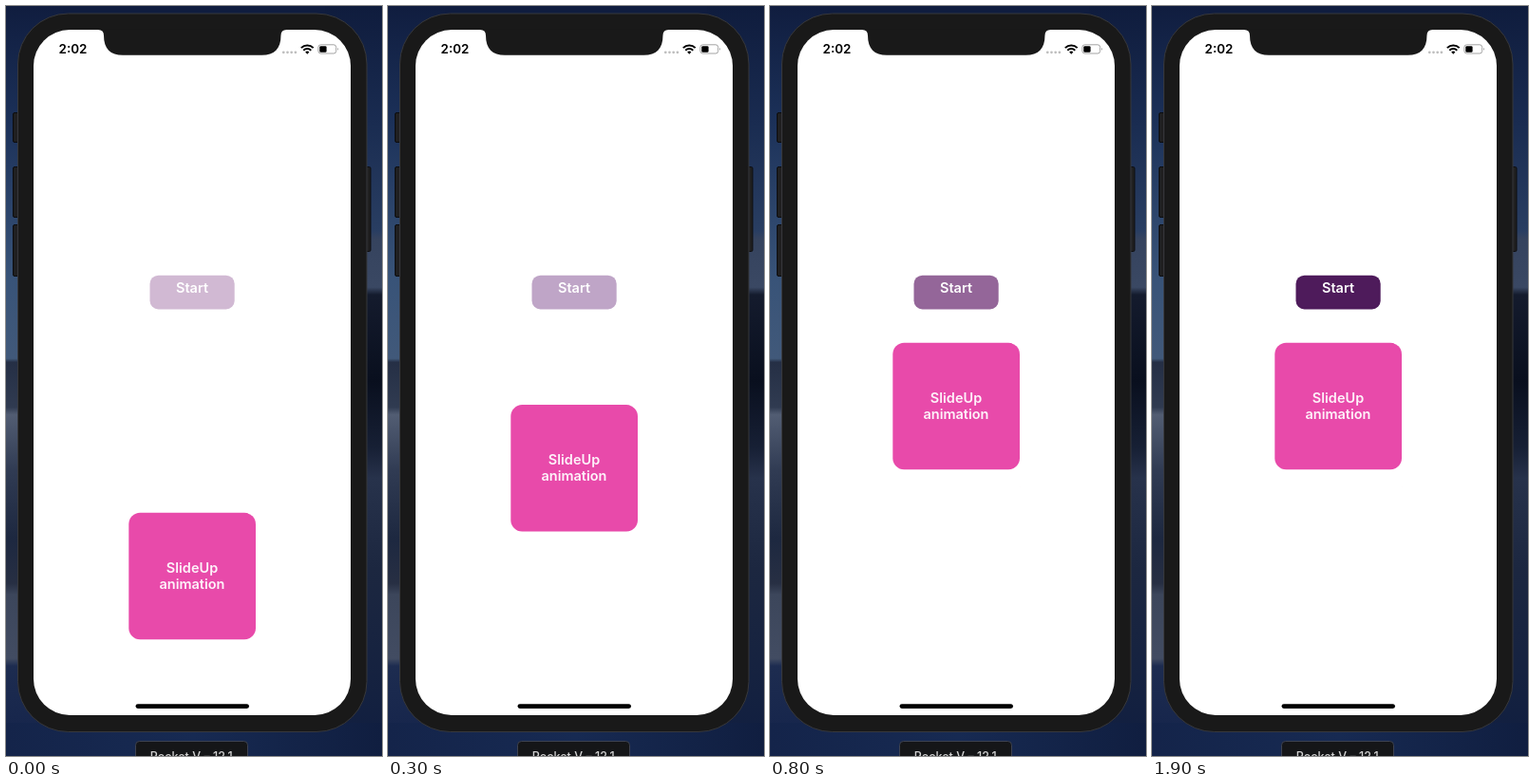
An HTML page for the animation above (2 s loop, 396x790 px).

```html
<!DOCTYPE html>
<html lang="en">
<head>
<meta charset="utf-8">
<style>
  html, body { margin: 0; width: 100%; height: 100%; overflow: hidden; background: #14213f; }
  svg { display: block; width: 396px; height: 790px; }
  text { font-family: Inter, "Open Sans", sans-serif; font-weight: 600; font-size: 14.5px; text-anchor: middle; fill: #fff; }
</style>
</head>
<body>
<svg viewBox="0 0 396 790">
  <defs>
    <linearGradient id="leftSky" gradientUnits="userSpaceOnUse" x1="0" y1="0" x2="0" y2="790">
      <stop offset="0" stop-color="#101d3f"/>
      <stop offset=".15" stop-color="#1b3058"/>
      <stop offset=".36" stop-color="#385378"/>
      <stop offset=".47" stop-color="#41597a"/>
      <stop offset=".475" stop-color="#252f45"/>
      <stop offset=".535" stop-color="#303b51"/>
      <stop offset=".545" stop-color="#525d73"/>
      <stop offset=".62" stop-color="#303b53"/>
      <stop offset=".71" stop-color="#1d2840"/>
      <stop offset=".77" stop-color="#272f43"/>
      <stop offset=".785" stop-color="#3c465b"/>
      <stop offset=".87" stop-color="#424c62"/>
      <stop offset=".88" stop-color="#1d2c50"/>
      <stop offset="1" stop-color="#14234a"/>
    </linearGradient>
    <linearGradient id="rightSky" gradientUnits="userSpaceOnUse" x1="0" y1="0" x2="0" y2="790">
      <stop offset="0" stop-color="#0f1c3d"/>
      <stop offset=".15" stop-color="#192b50"/>
      <stop offset=".3" stop-color="#293e62"/>
      <stop offset=".31" stop-color="#35435e"/>
      <stop offset=".375" stop-color="#3a4863"/>
      <stop offset=".385" stop-color="#141b2d"/>
      <stop offset=".5" stop-color="#090f1e"/>
      <stop offset=".59" stop-color="#172035"/>
      <stop offset=".63" stop-color="#27324b"/>
      <stop offset=".75" stop-color="#1c2740"/>
      <stop offset="1" stop-color="#101e40"/>
    </linearGradient>
    <linearGradient id="ground">
      <stop offset="0" stop-color="#14244a"/>
      <stop offset=".5" stop-color="#172a52"/>
      <stop offset="1" stop-color="#101e40"/>
    </linearGradient>
  </defs>

  <!-- desktop backdrop -->
  <rect width="396" height="790" fill="url(#ground)"/>
  <rect width="70" height="755" fill="url(#leftSky)"/>
  <rect x="326" width="70" height="755" fill="url(#rightSky)"/>
  <rect x="60" width="276" height="12" fill="#101d3f"/>

  <!-- handset -->
  <g fill="#202021" stroke="#0c0c0e">
    <rect x="7.5" y="112.5" width="9" height="31" rx="1.5"/>
    <rect x="7.5" y="169.500" width="9" height="53" rx="1.5"/>
    <rect x="7.5" y="230.500" width="9" height="54" rx="1.5"/>
    <rect x="375" y="169.500" width="9" height="89" rx="1.5"/>
  </g>
  <rect x="12.500" y="8" width="367.500" height="756.500" rx="53" fill="#191919" stroke="#37383c"/>
  <rect x="29" y="25" width="334" height="722" rx="38" fill="#fff"/>
  <path d="M97 24.500V25q6 0 6 6c0 14 7 20.800 20 20.800H269.500c13 0 20-6.800 20-20.800q0-6 6-6v-.5z" fill="#191919"/>

  <!-- status bar -->
  <text x="70.500" y="50" style="font-size:13.400px;fill:#000">2:02</text>
  <path d="M292.300 48.800h0M296.500 48.800h0M300.700 48.800h0M304.900 48.800h0" stroke="#bebebe" stroke-width="2.800" stroke-linecap="round"/>
  <g fill="none" stroke="#000" stroke-width="2">
    <path d="M310.900 44.100a9 9 0 0 1 12.800 0"/>
    <path d="M313.300 46.700a5.600 5.600 0 0 1 8 0"/>
  </g>
  <path d="M317.300 50.700l-2.100-2.200a3 3 0 0 1 4.200 0z"/>
  <rect x="328.900" y="40.800" width="18.800" height="9.200" rx="2.600" fill="#fff" stroke="#999" stroke-width=".9"/>
  <rect x="330.300" y="42.200" width="7.300" height="6.500" rx="1.300"/>
  <path d="M349 43.800q1.700 1.600 0 3.200z" fill="#888"/>

  <rect id="button" x="151.500" y="283.700" width="89.200" height="35.700" rx="9"/>
  <text x="196" y="302">Start</text>

  <g id="card">
    <rect x="129.300" y="0" width="133.700" height="133.500" rx="12" fill="#e84aaa"/>
    <text x="196" y="63.200" fill-opacity=".93">SlideUp</text>
    <text x="196" y="79.900" fill-opacity=".93">animation</text>
  </g>

  <rect x="136.500" y="735.200" width="119.500" height="4.800" rx="2.400"/>

  <!-- device caption -->
  <rect x="136.500" y="774.500" width="118" height="24" rx="4" fill="#151618" stroke="#3d4250"/>
  <text x="195.300" y="794.800" style="font-size:12.500px;font-weight:500;fill:#d2d2d2">Pocket V – 12.1</text>
</svg>
<script>
  const LOOP = 2000, STEP = 100, REST_Y = 354.8;
  const button = document.getElementById('button');
  const card = document.getElementById('card');

  // time in ms, then red, green, blue
  const tints = [
    [0, 209, 185, 211],
    [200, 197, 173, 205],
    [400, 185, 156, 192],
    [600, 168, 129, 173],
    [1100, 117, 61, 124],
    [1400, 94, 34, 103],
    [1900, 78, 27, 91]
  ];

  function tintAt(time) {
    const next = Math.max(1, tints.findIndex(([start]) => start >= time));
    const from = tints[next - 1], to = tints[next];
    const mix = (time - from[0]) / (to[0] - from[0]);
    return `rgb(${[1, 2, 3].map(i => Math.round(from[i] + (to[i] - from[i]) * mix))})`;
  }

  // Decelerating slide that comes to rest at 600 ms.
  function distanceLeft(time) {
    const k = Math.min(time, 600) / 200;
    return 179 - 78 * k + 6 * k * (k - 1) + 19 / 6 * k * (k - 1) * (k - 2);
  }

  function draw(now) {
    const time = Math.floor(now % LOOP / STEP) * STEP;
    button.setAttribute('fill', tintAt(time));
    card.setAttribute('transform', `translate(0 ${REST_Y + distanceLeft(time)})`);
    requestAnimationFrame(draw);
  }
  draw(0);
</script>
</body>
</html>
```
